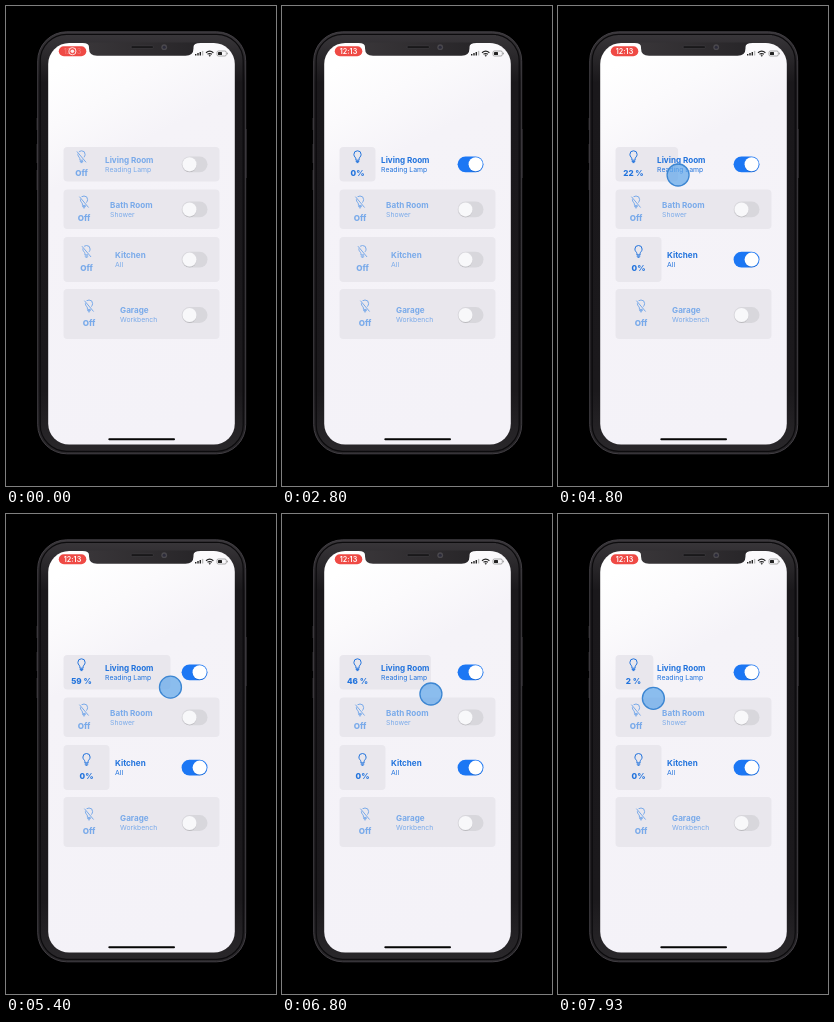
Recreate the animation shown at these times as an HTML page. Size 270 by 480 pixels, loop 8000 ms.

```html
<!DOCTYPE html>
<html lang="en">
<head>
<meta charset="utf-8">
<title>Light switches</title>
<style>
html, body { margin: 0; width: 100%; height: 100%; overflow: hidden; background: #000; }
svg { display: block; width: 100vw; height: 100vh; font-family: Inter, Roboto, sans-serif; }
.title, .level { font-size: 8.1px; font-weight: 700; }
.level { font-weight: 800; }
.sub { font-size: 6.85px; }
.level, .clock { text-anchor: middle; }
.clock { font-size: 7.2px; font-weight: 600; fill: #fff; }
.line { fill: none; stroke: currentColor; stroke-width: 1; stroke-linecap: round; stroke-linejoin: round; }
</style>
</head>
<body>
<svg viewBox="0 0 270 480">
  <defs>
    <linearGradient id="body" x2="0" y2="1">
      <stop stop-color="#3a373b"/><stop offset=".05" stop-color="#2c2a2d"/><stop offset=".12" stop-color="#1a181b"/>
      <stop offset=".85" stop-color="#1b191c"/><stop offset="1" stop-color="#2a282b"/>
    </linearGradient>
    <linearGradient id="notch">
      <stop stop-color="#393639"/><stop offset="1" stop-color="#272528"/>
    </linearGradient>
    <linearGradient id="screen" x1=".3" x2=".55" y2="1">
      <stop stop-color="#fff"/><stop offset=".13" stop-color="#fbfafc"/>
      <stop offset=".28" stop-color="#f5f3f8"/><stop offset="1" stop-color="#f4f2f8"/>
    </linearGradient>
    <filter id="soft" x="-40%" y="-40%" width="180%" height="180%">
      <feDropShadow dx="0" dy=".7" stdDeviation=".7" flood-opacity=".2"/>
    </filter>
  </defs>
  <rect width="270" height="480"/>
  <path d="M31.2 112v12M31.2 138v19M31.2 164v20M240 123v49" stroke="#343236" stroke-width="1.2"/>
  <rect x="31.7" y="25.8" width="208" height="422" rx="29" fill="url(#body)" stroke="#413e43" stroke-width="1"/>
  <rect x="34.2" y="28.3" width="203" height="417" rx="26.5" fill="none" stroke="#0c0b0d" stroke-width="1.2"/>
  <rect x="42.2" y="37" width="186.6" height="401.6" rx="21" fill="url(#screen)"/>
  <path d="M76.5 36.5h118v.5q-7 0-7 4v1.2q0 7.5-8 7.5H91q-8 0-8-7.5v-1.2q0-4-6.5-4z" fill="url(#notch)"/>
  <rect x="125" y="39.7" width="22.5" height="2.8" rx="1.4" fill="#19181a" stroke="#444246" stroke-width=".5"/>
  <circle cx="158.2" cy="41.2" r="2.9" fill="#4a484d"/><circle cx="158.2" cy="41.2" r="1.5" fill="#2c2b3a"/>

  <rect x="52.8" y="40.2" width="27.5" height="10.1" rx="5" fill="#ef4a45"/>
  <text id="clock" class="clock" x="66.5" y="47.9">12:13</text>
  <g id="record" fill="none" stroke="#fff" stroke-width=".9">
    <circle cx="66.4" cy="45.2" r="3.6"/><circle cx="66.4" cy="45.2" r="1.8" fill="#fff" stroke="none"/>
  </g>
  <g transform="translate(0 .5)">
    <path d="M189.7 49v-1.5M192 49v-2.5M194.3 49v-3.5" stroke="#222" stroke-width="1.4"/>
    <path d="M196.6 49v-4.6" stroke="#bbb" stroke-width="1.4"/>
    <g fill="none" stroke="#222" stroke-width="1.2">
      <path d="M200 46.2q3.7-3 7.4 0M201.5 47.8q2.2-1.6 4.4 0"/><circle cx="203.7" cy="49" r=".3"/>
    </g>
    <rect x="211" y="44.5" width="9.3" height="5" rx="1.4" fill="none" stroke="#888" stroke-width=".7"/>
    <rect x="212" y="45.5" width="4" height="3" rx=".6" fill="#222"/>
    <path d="M221.4 46.2v1.6" stroke="#888" stroke-width=".8"/>
  </g>

  <g id="rows"></g>
  <circle id="touch" r="11" fill="#62a8ea" fill-opacity=".72" stroke="#3c86d2" stroke-width="1.3"/>
  <rect x="102.3" y="432.3" width="66.7" height="2" rx="1" fill="#050505"/>
</svg>
<script>
const LOOP = 8000, LEFT = 57.5, RIGHT = 213.5;
const rows = [
  { title: "Living Room", sub: "Reading Lamp", y: 141, h: 34.5, w: 36, icon: 150.8, base: 169.6, head: 157, sw: 158.3, on: 1140 },
  { title: "Bath Room", sub: "Shower", y: 183.5, h: 39.5, w: 41, icon: 196, base: 214.6, head: 202, sw: 203.4 },
  { title: "Kitchen", sub: "All", y: 231, h: 45, w: 46, icon: 245.5, base: 264.6, head: 252, sw: 253.6, on: 3060 },
  { title: "Garage", sub: "Workbench", y: 283, h: 50, w: 51, icon: 300, base: 319.6, head: 307, sw: 309 }
];
const taps = [
  { x: 189.3, y: 160, from: 1000, to: 1230 },
  { x: 189, y: 254, from: 2920, to: 3150 }
];
// time, finger x, finger y
const drag = [
  [4400, 94, 167], [4550, 98, 167.5], [4800, 120, 169], [5250, 152, 172], [5650, 183, 175],
  [6000, 190, 177], [6200, 192, 177.5], [6450, 178, 178.5], [6800, 149, 180],
  [7300, 119, 182], [7700, 101, 183.5], [7930, 95.4, 184.3], [8000, 94.5, 184.3]
];

const $ = id => document.getElementById(id);
const clamp = v => Math.max(0, Math.min(1, v));
const mix = (a, b, p) => a + (b - a) * p;
const smooth = p => p * p * (3 - 2 * p);
const ramp = (t, start, length) => clamp((t - start) / length);
const blend = (a, b, p) => `rgb(${a.map((v, i) => Math.round(mix(v, b[i], p)))})`;

// Cubic curve through the drag points, column 1 or 2
function along(t, col) {
  let i = 0;
  while (i < drag.length - 2 && t > drag[i + 1][0]) i++;
  const slope = k => {
    const a = drag[Math.max(0, k - 1)], b = drag[Math.min(drag.length - 1, k + 1)];
    return (b[col] - a[col]) / (b[0] - a[0]);
  };
  const a = drag[i], b = drag[i + 1], d = b[0] - a[0], p = clamp((t - a[0]) / d), q = 1 - p;
  return smooth(q) * a[col] + smooth(p) * b[col] + d * p * q * (q * slope(i) - p * slope(i + 1));
}

$("rows").innerHTML = rows.map(r => {
  const mid = LEFT + r.w / 2, textX = LEFT + r.w + 5.6;
  return `<g>
    <rect class="fill" x="${LEFT}" y="${r.y}" height="${r.h}" rx="4" fill="#e9e7ed"/>
    <g class="line" transform="translate(${mid} ${r.icon})">
      <path d="M-1.6 3V2C-1.6 .6-3.6 0-3.6-2.4a3.6 3.6 0 0 1 7.2 0C3.6 0 1.6 .6 1.6 2V3ZM-1.4 4.6H1.4M-.6 5.8H.6"/>
      <g class="slash"><path d="M-4-5.4 4.3 4.9" stroke="#e9e7ed" stroke-width="2.2"/><path d="M-4.3-5 4.3 5.2"/></g>
    </g>
    <text class="level" x="${mid}" y="${r.base}" fill="currentColor"></text>
    <text class="title" x="${textX}" y="${r.head}" fill="currentColor">${r.title}</text>
    <text class="sub" x="${textX}" y="${r.head + 8.7}" fill="currentColor">${r.sub}</text>
    <rect class="track" x="175.6" y="${r.sw - 7.9}" width="25.9" height="15.8" rx="7.9"/>
    <circle class="knob" cy="${r.sw}" r="7" filter="url(#soft)"/>
  </g>`;
}).join("");

rows.forEach((r, i) => {
  const group = $("rows").children[i];
  r.group = group;
  for (const name of ["fill", "slash", "level", "track", "knob"]) r[name + "El"] = group.querySelector("." + name);
});

function drawRow(r, t, fingerX) {
  const start = r.on ?? Infinity, isOn = t >= start;
  const lit = ramp(t, start, 180), slide = smooth(ramp(t, start + 20, 250));
  let edge = mix(RIGHT, LEFT + r.w, smooth(ramp(t, start, 560)));
  let label = isOn ? "0%" : "Off";
  if (r === rows[0] && t >= drag[0][0]) {
    edge = Math.max(LEFT + r.w, fingerX);
    const level = Math.round(Math.max(0, fingerX - 93) / 1.21);
    label = level + " %";
  }
  r.group.style.color = blend([121, 170, 234], [33, 115, 221], isOn ? mix(.6, 1, lit) : 0);
  r.fillEl.setAttribute("width", edge - LEFT);
  r.slashEl.style.display = isOn ? "none" : "";
  if (r.levelEl.textContent !== label) r.levelEl.textContent = label;
  r.trackEl.style.fill = blend([216, 215, 220], [28, 119, 244], slide);
  r.knobEl.style.fill = blend([248, 248, 250], [255, 255, 255], slide);
  r.knobEl.setAttribute("cx", mix(183.5, 193.6, slide));
}

function draw(t) {
  const x = along(t, 1), y = along(t, 2);
  rows.forEach(r => drawRow(r, t, x));

  const seen = (from, to) => Math.min(ramp(t, from, 100), 1 - ramp(t, to, 180));
  const finger = [...taps, { x, y, from: 4330, to: LOOP }]
    .find(f => t >= f.from && t < f.to + 180);
  const touch = $("touch");
  touch.style.opacity = finger ? seen(finger.from, finger.to) : 0;
  if (finger) {
    touch.setAttribute("cx", finger.x);
    touch.setAttribute("cy", finger.y);
  }

  const fade = ramp(t, 0, 300);
  $("clock").style.opacity = mix(.25, 1, fade);
  $("record").style.opacity = .9 * (1 - fade);
}

const began = performance.now();
function tick() {
  draw((performance.now() - began) % LOOP);
  requestAnimationFrame(tick);
}
tick();
</script>
</body>
</html>
```
